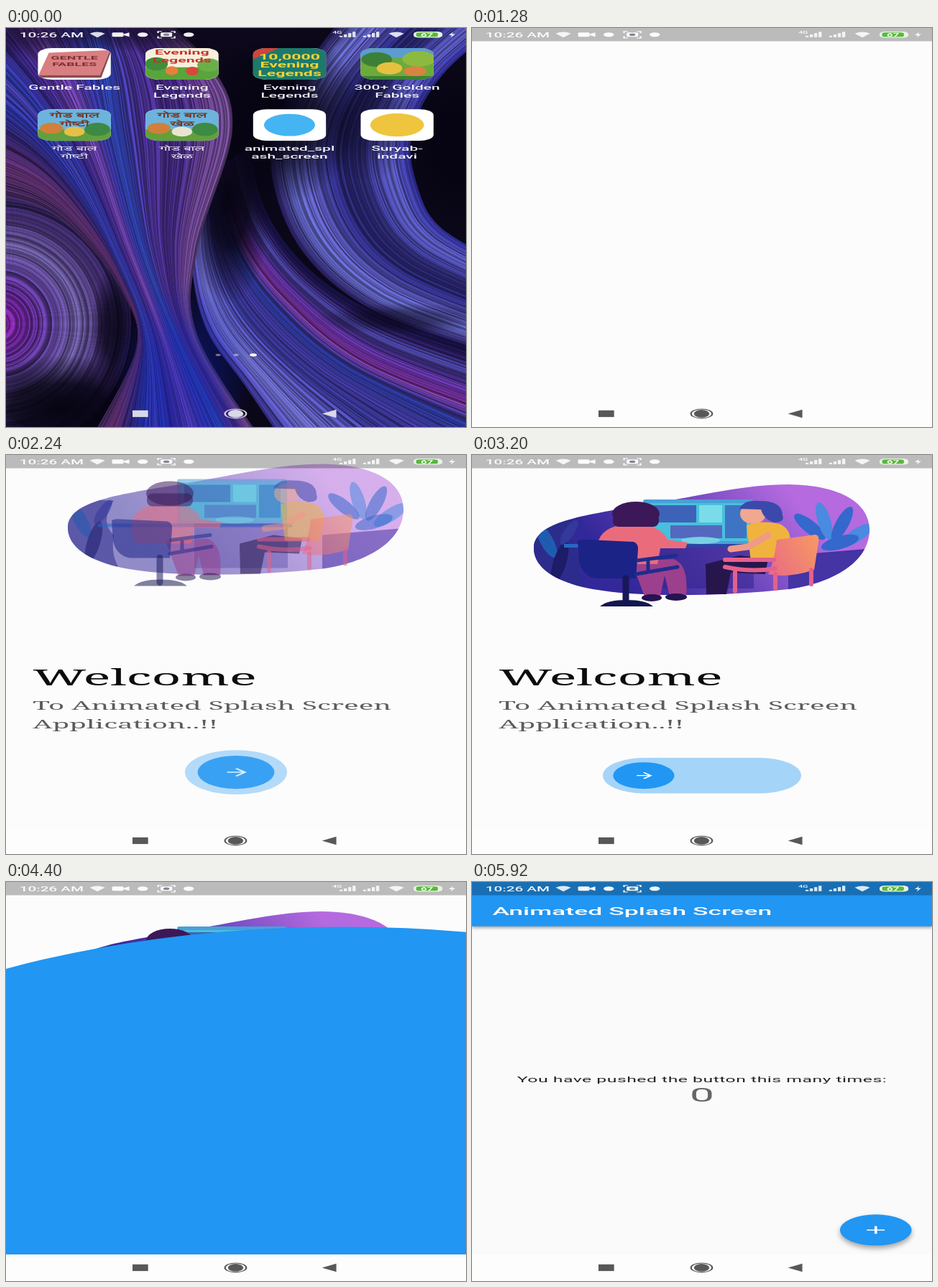
These frames come from a looping animation (640x556 px, 7440 ms). An HTML page with a canvas:

```html
<!DOCTYPE html>
<html lang="en">
<head>
<meta charset="utf-8">
<title>Animated Splash Screen</title>
<style>
html, body { margin: 0; width: 100%; height: 100%; overflow: hidden; background: #fdfdfd; }
canvas { display: block; }
</style>
</head>
<body>
<canvas id="stage" width="640" height="556"></canvas>
<script>
const W = 640, H = 556, LOOP = 7440, STEP = 80;
// The phone screen of 360 x 720 dp fills a wider stage.
const SX = W / 360, SY = H / 720;
const BLUE = '#2196f3', PAPER = '#fcfcfc';
const SANS = 'Roboto, "Noto Sans", sans-serif', SERIF = '"Noto Serif", serif';
const ctx = stage.getContext('2d');
const TAU = Math.PI * 2;

const clamp = v => Math.min(1, Math.max(0, v));
const lerp = (a, b, u) => a + (b - a) * u;
const span = (t, start, length) => clamp((t - start) / length);

function bezier(x1, y1, x2, y2) {
  const f = (a, b, s) => 3 * a * s * (1 - s) ** 2 + 3 * b * s * s * (1 - s) + s ** 3;
  return t => {
    let lo = 0, hi = 1;
    for (let i = 0; i < 24; i++) {
      const m = (lo + hi) / 2;
      if (f(x1, x2, m) < t) lo = m; else hi = m;
    }
    return f(y1, y2, lo);
  };
}
const easeOut = bezier(0, 0, .58, 1), easeIn = bezier(.42, 0, 1, 1), fastOutSlowIn = bezier(.4, 0, .2, 1);

let seed = 11;
const rand = () => (seed = (seed * 16807) % 2147483647) / 2147483647;

function group(fn) { ctx.save(); fn(); ctx.restore(); }
function rect(x, y, w, h, fill, r = 0) {
  ctx.fillStyle = fill;
  ctx.beginPath(); ctx.roundRect(x, y, w, h, r); ctx.fill();
}
function oval(x, y, rx, ry, fill, turn = 0) {
  ctx.fillStyle = fill;
  ctx.beginPath(); ctx.ellipse(x, y, rx, ry, turn, 0, TAU); ctx.fill();
}
function shape(d, fill) { ctx.fillStyle = fill; ctx.fill(new Path2D(d)); }
function line(d, color, width) {
  ctx.strokeStyle = color; ctx.lineWidth = width; ctx.stroke(new Path2D(d));
}
function text(s, x, y, font, fill, align = 'left') {
  ctx.font = font; ctx.fillStyle = fill; ctx.textAlign = align;
  ctx.fillText(s, x, y);
}

// ---------- wallpaper ----------
function mix(stops, u, light) {
  const p = u * (stops.length - 1), i = Math.min(stops.length - 2, Math.floor(p));
  const ch = (c, k) => parseInt(c.substr(1 + 2 * k, 2), 16);
  return `rgb(${[0, 1, 2].map(k => Math.min(255, light * lerp(ch(stops[i], k), ch(stops[i + 1], k), p - i)))})`;
}
function fibres(c, a, b, n, stops) {
  for (let i = 0; i <= n; i++) {
    const u = i / n, p = a.map((q, k) => [lerp(q[0], b[k][0], u), lerp(q[1], b[k][1], u)]);
    const at = k => p[Math.min(p.length - 1, Math.max(0, k))];
    c.strokeStyle = mix(stops, u, .55 + rand() * .7);
    c.lineWidth = 2 + rand() * 1.5;
    c.beginPath(); c.moveTo(...p[0]);
    for (let k = 0; k < p.length - 1; k++) {
      const [o, s, e, z] = [at(k - 1), at(k), at(k + 1), at(k + 2)];
      c.bezierCurveTo(s[0] + (e[0] - o[0]) / 6, s[1] + (e[1] - o[1]) / 6,
        e[0] - (z[0] - s[0]) / 6, e[1] - (z[1] - s[1]) / 6, ...e);
    }
    c.stroke();
  }
}
function tint(c, x, y, rx, ry, alpha, rgb = '6,4,18') {
  const g = c.createRadialGradient(0, 0, 0, 0, 0, 1);
  g.addColorStop(0, `rgba(${rgb},${alpha})`);
  g.addColorStop(.45, `rgba(${rgb},${alpha * .85})`);
  g.addColorStop(1, `rgba(${rgb},0)`);
  c.save(); c.translate(x, y); c.scale(rx, ry);
  c.fillStyle = g; c.fillRect(-1, -1, 2, 2); c.restore();
}
function paintWallpaper() {
  const cv = document.createElement('canvas');
  cv.width = W; cv.height = H;
  const c = cv.getContext('2d');
  c.fillStyle = '#0a0718'; c.fillRect(0, 0, W, H);

  // right side: two fans rising into the dark
  const seam = [[300, 190], [325, 285], [385, 372], [500, 465], [700, 545]];
  fibres(c, seam, [[335, 170], [365, 265], [430, 345], [530, 405], [690, 460]], 80,
    ['#8c34b0', '#6a34a8', '#3c2878', '#48429c', '#2a1c60', '#141040']);
  fibres(c, [[268, 230], [260, 330], [280, 420], [335, 500], [420, 625]], seam, 100,
    ['#4038a4', '#6c6cc8', '#5654b4', '#3c3aa0', '#40389c', '#2c3aa0', '#7c389c']);
  fibres(c, [[480, -30], [400, 80], [368, 180], [405, 300], [505, 390], [680, 455]],
    [[720, -30], [610, 60], [563, 150], [574, 230], [605, 280], [680, 325]], 110,
    ['#20164c', '#6064c0', '#5a58b8', '#302e84', '#28246c', '#4240a0', '#5c5cc0', '#2e2c90']);
  tint(c, 310, 235, 62, 150, 1);
  tint(c, 385, 120, 105, 125, .95);
  tint(c, 500, 125, 75, 90, .45);
  tint(c, 628, 165, 75, 110, 1);
  tint(c, 550, 405, 120, 22, .5);

  // left eye
  for (let r = 185; r > 2; r -= 2) {
    c.strokeStyle = mix(['#a42cc0', '#7428a8', '#5a3c94', '#6c5ca0', '#443070', '#2a1c50'], r / 185, .55 + rand() * .75);
    c.lineWidth = 2.2;
    c.beginPath(); c.ellipse(-12, 412, r, r * .98, 0, 0, TAU); c.stroke();
  }
  tint(c, 75, 530, 150, 75, 1);
  tint(c, 150, 420, 32, 90, .8);

  // left ribbons
  const left = [[-60, 10], [30, 100], [95, 190], [150, 300], [200, 430], [215, 590]];
  const middle = [[110, -60], [140, 50], [155, 150], [190, 300], [240, 430], [320, 590]];
  fibres(c, [[-60, 225], [40, 245], [105, 290], [165, 370], [182, 450], [110, 590]], left, 90,
    ['#40285c', '#683478', '#34246c', '#2c34a0', '#443ca4']);
  fibres(c, left, middle, 90, ['#2c3cac', '#442c98', '#7848b8', '#3836a4', '#3450c4']);
  fibres(c, middle, [[190, -40], [285, 55], [313, 145], [264, 310], [265, 430], [365, 590]], 90,
    ['#3044b8', '#5038a4', '#482c88', '#442a80', '#66408c', '#7c52a0']);
  tint(c, 245, 500, 95, 150, .42, '14,36,190');
  tint(c, 40, 0, 190, 45, .65, '20,10,36');
  tint(c, 300, 0, 200, 45, .8, '14,8,28');

  c.filter = 'blur(.7px)';
  c.drawImage(cv, 0, 0);
  return cv;
}
const wallpaper = paintWallpaper();

// ---------- home screen ----------
const SLOT = 57;
const apps = [
  [['Gentle Fables'], () => {
    shape('M-20-20L28-25L20 20L-28 20Z', '#d97f82');
    shape('M-28 20L20 20L28-25L28-18L21 25L-26 25Z', '#8c4a4c');
    caption(['GENTLE', 'FABLES'], -8, '#7a3034', 10);
  }],
  [['Evening', 'Legends'], () => {
    rect(-29, -29, 58, 58, '#f6f0dc'); rect(-29, 6, 58, 23, '#5aa43c');
    oval(-20, 0, 9, 12, '#3f8e3a'); oval(21, 2, 9, 12, '#6ab04a');
    oval(-8, 12, 5, 8, '#e8803c'); oval(8, 13, 5, 8, '#d8483c');
    caption(['Evening', 'Legends'], -17, '#c83228', 12);
  }],
  [['Evening', 'Legends'], () => {
    rect(-29, -29, 58, 58, '#1d7a6a');
    shape('M-29-29L-8-29L-29-8Z', '#d0453c');
    caption(['10,0000', 'Evening', 'Legends'], -8, '#f4d438', 13);
  }],
  [['300+ Golden', 'Fables'], () => {
    rect(-29, -29, 58, 58, '#6cab3a'); rect(-29, -29, 58, 18, '#5c9cd0');
    oval(-16, -8, 12, 13, '#3c8038'); oval(17, -9, 13, 14, '#8cba40');
    oval(-6, 8, 10, 11, '#e8c040'); oval(14, 13, 9, 9, '#d88440');
    rect(-29, 22, 58, 7, '#3c8038');
  }],
  [['गोड बाल', 'गोष्टी'], () => scenery('#e4c048', ['गोड बाल', 'गोष्टी'])],
  [['गोड बाल', 'खेळ'], () => scenery('#e8e4d0', ['गोड बाल', 'खेळ'])],
  [['animated_spl', 'ash_screen'], () => oval(0, 0, 20, 20, '#45b4f2')],
  [['Suryab-', 'indavi'], () => oval(0, 0, 21, 21, '#eec53c')]
];
function caption(rows, y, fill, size) {
  rows.forEach((s, i) => text(s, 0, y + i * size * 1.15, `700 ${size}px ${SANS}`, fill, 'center'));
}
function scenery(sun, rows) {
  rect(-29, -29, 58, 58, '#6cb4dc'); rect(-29, 8, 58, 21, '#62a03c');
  oval(-18, 6, 9, 10, '#d08038'); oval(0, 12, 8, 9, sun); oval(18, 8, 10, 12, '#3c8a44');
  caption(rows, -13, '#6c3424', 13);
}
function drawIcon([label, art], i) {
  const x = 53.5 + 84.2 * (i % 4), y = i < 4 ? 64.8 : 175;
  group(() => {
    ctx.translate(x, y);
    ctx.beginPath(); ctx.roundRect(-SLOT / 2, -SLOT / 2, SLOT, SLOT, 11); ctx.clip();
    rect(-29, -29, 58, 58, '#fff');
    art();
  });
  label.forEach((s, k) => text(s, x, y + 46 + 14.4 * k, `500 11.8px ${SANS}`, '#f4f2fa', 'center'));
}
function drawHome(t) {
  const p = 1 - (1 - span(t, 640, 400)) ** 1.7, zoom = 1 - .136 * p;
  group(() => { ctx.scale(1 / SX, 1 / SY); ctx.drawImage(wallpaper, 0, 0); });
  group(() => {
    ctx.translate(180, 360); ctx.scale(zoom, zoom); ctx.translate(-180, -360);
    apps.forEach(drawIcon);
    [166, 180, 193.5].forEach((x, i) => oval(x, 590, i < 2 ? 2 : 2.8, i < 2 ? 2 : 2.8, i < 2 ? '#ffffff70' : '#fff'));
  });
  drawNav(`rgba(225,225,235,${lerp(.95, 0, p)})`);
  if (p > 0) {
    const l = lerp(193.5, 0, p), r = lerp(250.5, 360, p), top = lerp(146.5, 0, p), bottom = lerp(204, 672, p);
    rect(l, top, r - l, bottom - top, '#fdfdfd');
  }
}

// ---------- system bars ----------
function wifi(x) { shape(`M${x} 17L${x - 6} 10Q${x} 4 ${x + 6} 10Z`, '#ffffffd8'); }
function bars(x) {
  for (let i = 0; i < 4; i++) rect(x + i * 3.4, 14 - 2.4 * i, 2.4, 2.6 + 2.4 * i, '#ffffffd8');
}
function drawStatus() {
  const white = '#fffffff0';
  text('10:26 AM', 10.6, 16.5, `500 11.6px ${SANS}`, white);
  wifi(71.5);
  rect(83, 8, 9, 8, white, 1.5); shape('M92 11L96.5 8V16L92 13Z', white);
  oval(107, 12, 4, 4, white);
  line('M119 9V6H122M129 6H132V9M132 15V18H129M122 18H119V15', white, 1.3);
  rect(121, 8, 9, 8, white, 1.5); oval(125.5, 12, 2.4, 2.4, '#808898');
  oval(143, 12, 4, 4, white);
  text('4G', 255.5, 11, `500 6px ${SANS}`, white);
  bars(261); bars(279.5);
  wifi(305.5);
  rect(319, 6.5, 22.5, 11, '#e8f4e4', 4); rect(321, 8, 17, 8, '#58b83c', 2.5);
  text('67', 329.5, 15.2, `700 8.5px ${SANS}`, '#f4fff0', 'center');
  shape('M350 7L346.5 13H349L348 17.5L351.5 11H349Z', white);
}
function drawNav(color) {
  rect(99, 690, 12.2, 12, color);
  oval(179.7, 696, 6, 7, color);
  ctx.strokeStyle = color; ctx.lineWidth = 1.3;
  ctx.beginPath(); ctx.arc(179.7, 696, 8.3, 0, TAU); ctx.stroke();
  shape('M247.3 696L258.5 688.5V703.5Z', color);
}

// ---------- welcome screen ----------
function drawPicture() {
  ctx.scale(1 / SX, 1 / SY);
  const sky = ctx.createLinearGradient(430, 40, 240, 200);
  sky.addColorStop(0, '#b56adf'); sky.addColorStop(.5, '#6a46bc'); sky.addColorStop(1, '#33289a');
  const blob = 'M86 130C86 92 160 83 245 69C320 56 380 41 440 41C515 42 553 68 553 104C553 150 500 179 440 187C340 198 200 200 140 180C106 169 86 152 86 130Z';
  shape(blob, sky);
  group(() => {
    ctx.clip(new Path2D(blob));
    shape('M86 90L150 92Q130 122 150 140Q145 170 160 190L86 185Z', '#2c2c8c');
    oval(104, 120, 9, 26, '#1f5cb0', -.5); oval(122, 150, 9, 30, '#1c1c68', .3); oval(135, 108, 7, 20, '#34389c', .6);
    [[470, 100, -.9], [490, 92, -.3], [515, 96, .5], [535, 112, 1], [512, 122, 1.3]].forEach(([x, y, a], i) =>
      oval(x, y, 9, 27, i % 2 ? '#4a8ae0' : '#3468cc', a));
    shape('M440 140L560 130V200H440Z', '#4434a4');
  });
  rect(238, 62, 153, 64, '#4a9fd8', 3); rect(243, 67, 143, 53, '#48c0dc');
  rect(248, 70, 64, 24, '#3d63b8'); rect(316, 70, 32, 24, '#7adce8'); rect(352, 70, 30, 46, '#3f74c4');
  rect(276, 98, 72, 18, '#5468c0');
  rect(128, 124, 270, 5, '#2868c4'); rect(262, 124, 130, 62, '#30248c88');
  oval(318, 119, 27, 5, '#79d0e4');
  shape('M325 152L372 140L412 145L408 166L360 164L354 194H326Z', '#27164c');
  // left figure and chair
  shape('M222 148L280 145Q302 152 298 196H275L268 168L262 197H240Z', '#9c3f8c');
  oval(250, 199, 14, 5, '#241450'); oval(284, 198, 15, 5, '#241450');
  shape('M174 130Q175 104 205 98L244 98Q266 104 272 118L300 122L297 130L262 130L258 152H180Z', '#ea6c7c');
  oval(228, 82, 33, 17, '#3c1858'); rect(196, 82, 64, 18, '#3c1858', 8);
  shape('M147 120Q150 117 160 118L225 121Q232 124 231 132L228 172H172Q153 168 149 148Z', '#1c2386');
  ctx.lineCap = 'round';
  line('M230 147L284 140M228 166L286 156M245 145V162', '#1f2c8c', 5);
  line('M214 172V206', '#17185c', 9);
  shape('M178 211Q188 202 215 202Q242 202 252 211Z', '#14164f');
  // right figure and chair
  oval(391, 82, 18, 14, '#f0a890');
  shape('M372 75Q378 62 400 64Q432 64 432 84Q436 94 420 94Q406 90 402 76Z', '#3b49ac');
  shape('M382 98Q404 90 428 96Q446 104 442 125L436 148H388Z', '#f0b43e');
  line('M412 112L384 128L360 131', '#f09a88', 9);
  const seat = ctx.createLinearGradient(380, 170, 482, 110);
  seat.addColorStop(0, '#e45a90'); seat.addColorStop(1, '#f79a62');
  shape('M424 118L478 111Q484 112 482 122L476 160Q440 172 412 166Q420 150 424 118Z', seat);
  line('M352 156Q390 164 422 158M352 146L420 146M366 162V190M422 166V186M472 160V180', '#e4608c', 6);
}
function drawSlider(t) {
  const grown = span(t, 2889, 600), moved = span(t, 3489, 720), burst = span(t, 4209, 300);
  const zoom = lerp(1, .8, span(t, 2589, 300)), width = lerp(80, 300, grown);
  ctx.translate(180, 578.5); ctx.scale(zoom, zoom);
  rect(-width / 2, -40, width, 80, 'rgba(33,150,243,.4)', 40);
  ctx.translate(40 - width / 2 + 215 * moved, 0);
  oval(0, 0, lerp(30, 960, burst), lerp(30, 960, burst), BLUE);
  if (!burst) line('M-7 0H7M0-7L7 0L0 7', '#fff', 2);
}
function fadeIn(t, start, draw) {
  const u = span(t, start, 500);
  if (u) group(() => {
    ctx.globalAlpha = u;
    ctx.translate(0, -130 * (1 - easeOut(u)));
    draw();
  });
}
function drawWelcome(t) {
  rect(0, 0, 360, 720, PAPER);
  fadeIn(t, 1975, drawPicture);
  fadeIn(t, 1675, () => {
    text('To Animated Splash Screen', 21, 460, `21.7px ${SERIF}`, '#5c5c5c');
    text('Application..!!', 21, 494, `21.7px ${SERIF}`, '#5c5c5c');
  });
  fadeIn(t, 1525, () => text('Welcome', 21, 416, `500 40px ${SERIF}`, '#0c0c0c'));
  fadeIn(t, 1825, () => drawSlider(t));
}

// ---------- counter page ----------
function shadow(blur, y) {
  ctx.shadowColor = 'rgba(0,0,0,.35)'; ctx.shadowBlur = blur; ctx.shadowOffsetY = y;
}
function drawCounter(t) {
  const u = span(t, 4618, 300);
  if (!u) return;
  group(() => {
    ctx.globalAlpha = easeIn(u);
    ctx.translate(0, 180 * (1 - fastOutSlowIn(u)));
    rect(0, 0, 360, 720, '#fafafa');
    group(() => { shadow(4, 2); rect(0, 0, 360, 80, BLUE); });
    text('Animated Splash Screen', 16, 59.5, `500 20px ${SANS}`, '#fff');
    ctx.letterSpacing = '.25px';
    text('You have pushed the button this many times:', 180, 361, `14px ${SANS}`, '#222', 'center');
    ctx.letterSpacing = '0px';
    text('0', 180, 396, `34px ${SANS}`, '#666', 'center');
    group(() => { shadow(7, 4); oval(316, 628, 28, 28, BLUE); });
    line('M309 628H323M316 621V635', '#fff', 2);
  });
}

function draw(t) {
  ctx.setTransform(SX, 0, 0, SY, 0, 0);
  if (t < 1040) drawHome(t);
  else {
    drawWelcome(t);
    drawCounter(t);
    rect(0, 0, 360, 24, 'rgba(0,0,0,.26)');
    rect(0, 672, 360, 48, '#fdfdfd');
    drawNav('#585858');
  }
  drawStatus();
}
function tick(now) {
  draw(Math.floor(now % LOOP / STEP) * STEP);
  requestAnimationFrame(tick);
}
requestAnimationFrame(tick);
</script>
</body>
</html>
```
